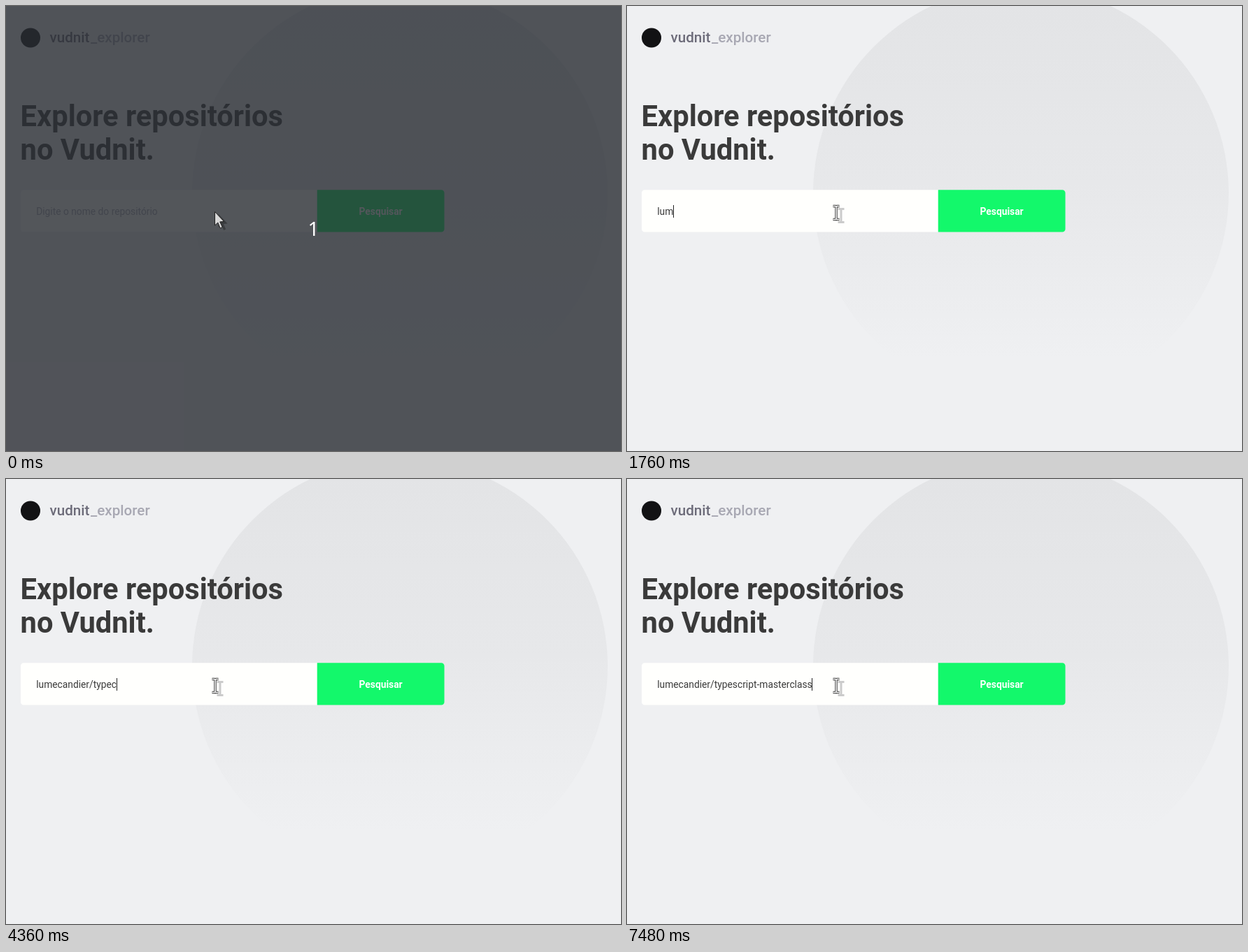
Write an HTML page that moves like this. It is 879 px wide and 637 px high and loops after 8 s.

```html
<!DOCTYPE html>
<html lang="pt">
<head>
<meta charset="utf-8">
<style>
  html, body { margin: 0; width: 100%; height: 100%; overflow: hidden; background: #eff0f2; }
  svg { display: block; font: 13.8px Roboto, sans-serif; }
  .title { font-size: 41.65px; font-weight: 700; fill: #3a3a3a; }
  .brand { font-size: 20.6px; font-weight: 500; }
</style>
</head>
<body>
<svg width="879" height="637" viewBox="0 0 879 637">
  <defs>
    <linearGradient id="fade" gradientUnits="userSpaceOnUse" x1="0" y1="0" x2="0" y2="505">
      <stop offset="0" stop-color="#e3e4e6"/>
      <stop offset=".5" stop-color="#e7e8ea"/>
      <stop offset="1" stop-color="#eff0f2"/>
    </linearGradient>
    <path id="beam" fill="none" d="M294.5 286.5h3.5q1 0 1 1v17q0 1-1 1h-3.5M303.5 286.5h-3.5q-1 0-1 1M303.5 305.5h-3.5q-1 0-1-1"/>
    <path id="pointer" d="M298.5 294.5V314l4.3-4 3.4 8 3-1.4-3.4-7.7 5.8-.4z"/>
  </defs>

  <rect width="879" height="637" fill="#eff0f2"/>
  <circle cx="563" cy="268" r="297" fill="url(#fade)"/>

  <circle cx="35" cy="45.5" r="14" fill="#121214"/>
  <text class="brand" x="62.5" y="52.3" fill="#6c6b79">vudnit</text>
  <text class="brand" x="121" y="52.3" fill="#a8a8b3">_explorer</text>

  <text class="title" x="20.6" y="172.3">Explore repositórios</text>
  <text class="title" x="20.6" y="220.3">no Vudnit.</text>

  <path d="M445 263.3H25.3a4.3 4.3 0 0 0-4.3 4.3v51.6a4.3 4.3 0 0 0 4.3 4.3H445z" fill="#fffffd"/>
  <path d="M444.7 263.3h177.5a4.3 4.3 0 0 1 4.3 4.3v51.6a4.3 4.3 0 0 1-4.3 4.3H444.7z" fill="#13f86b"/>
  <text x="535.6" y="298.8" text-anchor="middle" font-weight="700" fill="#fff">Pesquisar</text>

  <text id="hint" x="43.2" y="298.8" fill="#a8a8b3">Digite o nome do repositório</text>
  <text id="entry" x="43.2" y="298.8" fill="#3a3a3a"></text>
  <rect id="caret" y="285" width="1" height="18" fill="#222"/>

  <g id="ready">
    <use href="#beam" transform="translate(7 4)" stroke="#cbcbcb" stroke-width="3"/>
    <use href="#beam" stroke="#333" stroke-width="3.4"/>
    <use href="#beam" stroke="#fff" stroke-width="1.5"/>
  </g>

  <g id="countdown">
    <rect width="879" height="637" fill="#292c33" fill-opacity=".8"/>
    <use href="#pointer" transform="translate(5 3)" fill="#000" opacity=".3"/>
    <use href="#pointer" fill="#d8d8d8" stroke="#222"/>
    <text x="439.5" y="328.5" text-anchor="middle" fill="#fff" style="font:28px 'Noto Sans', 'Open Sans', sans-serif">1</text>
  </g>
</svg>
<script>
  const LOOP = 8000, START = 320, CARET_ON = 600, CARET_OFF = 1160;
  // "<" is a backspace; each key has its press time in ms
  const keys = 'lumecandier/typecr<<script-masterclass';
  const times = [
    1440, 1600, 1760, 1960, 2160, 2400, 2520, 2640, 2800, 2840, 3000, 3600,
    3720, 3880, 4000, 4120, 4360, 4520, 5040, 5160,
    5240, 5360, 5520, 5600, 5720, 5840, 6000,
    6280, 6440, 6520, 6600, 6720, 6800, 7120, 7200, 7240, 7320, 7480
  ];
  const el = id => document.getElementById(id);
  const [hint, entry, caret, ready, countdown] =
    ['hint', 'entry', 'caret', 'ready', 'countdown'].map(el);
  const show = (node, on) => node.style.display = on ? '' : 'none';

  function typedAt(t) {
    let text = '';
    times.forEach((time, i) => {
      if (time <= t) text = keys[i] === '<' ? text.slice(0, -1) : text + keys[i];
    });
    return text;
  }

  function draw(now) {
    const t = now % LOOP, text = typedAt(t);
    show(countdown, t < START);
    show(ready, t >= START);
    show(hint, !text);
    show(caret, text || (t >= CARET_ON && t < CARET_OFF));
    if (entry.textContent !== text) entry.textContent = text;
    const width = text ? entry.getComputedTextLength() : 0;
    caret.setAttribute('x', Math.floor(43.2 + width));
    requestAnimationFrame(draw);
  }
  draw(performance.now());
</script>
</body>
</html>
```
